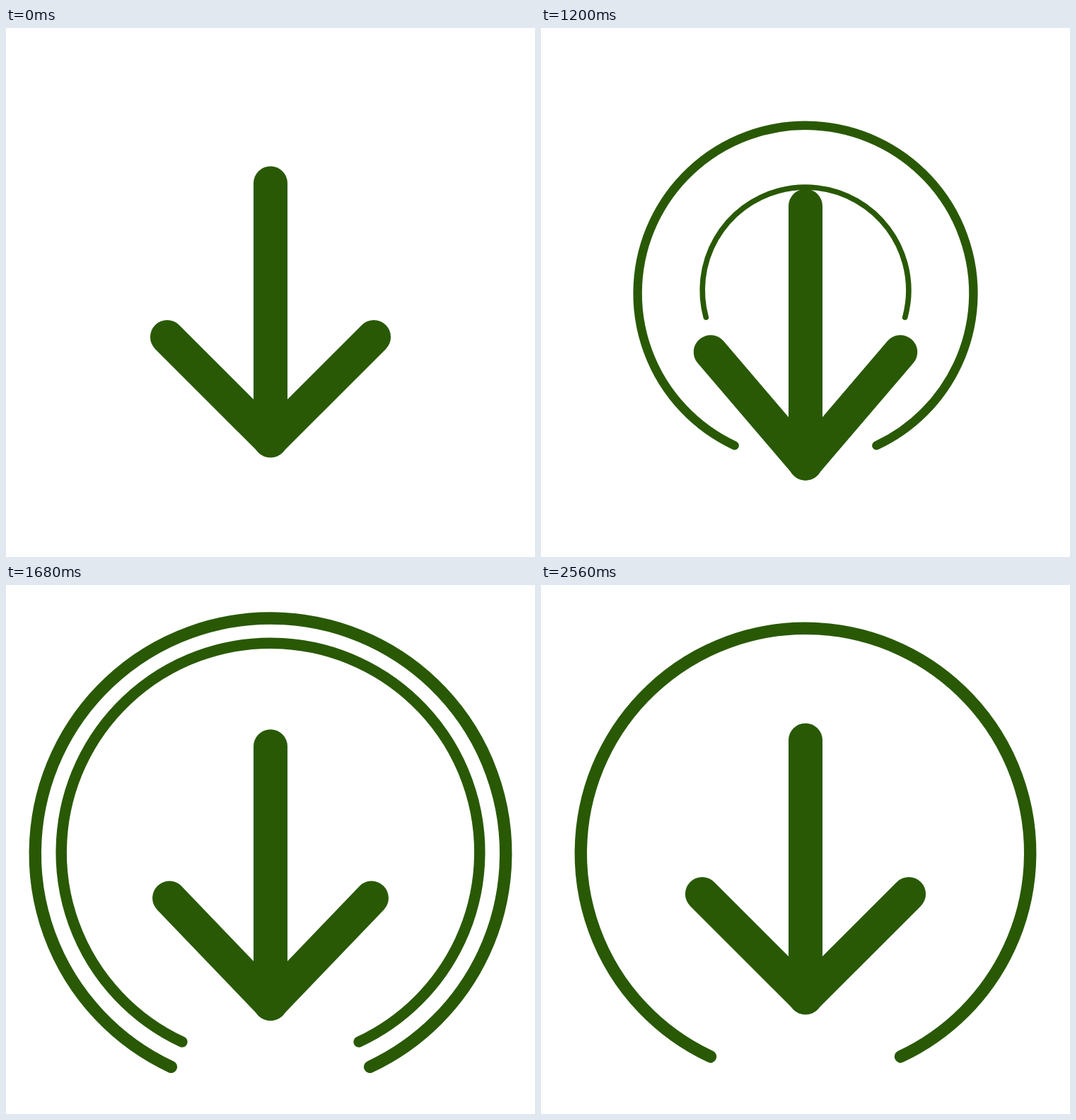
An HTML page with a canvas for the animation above (2720 ms loop, 748 px wide and 748 px high).

```html
<!DOCTYPE html>
<html lang="en">
<head>
<meta charset="utf-8">
<title>Download arrow</title>
<style>
  html, body { margin: 0; width: 100%; height: 100%; overflow: hidden; background: #fff; }
  canvas { display: block; width: 100vmin; height: 100vmin; }
</style>
</head>
<body>
<canvas id="stage" width="748" height="748"></canvas>
<script>
  const ctx = document.getElementById('stage').getContext('2d');
  const COLOR = '#295905';
  const LOOP = 2720, STEP = 40, LAST = 2560;
  const CX = 374, DEG = Math.PI / 180;

  // Eased progress from 0 to 1 between two times.
  function ease(t, start, end) {
    const u = Math.min(1, Math.max(0, (t - start) / (end - start)));
    return u * u * (3 - 2 * u);
  }

  function line(x1, y1, x2, y2) {
    ctx.beginPath();
    ctx.moveTo(x1, y1);
    ctx.lineTo(x2, y2);
    ctx.stroke();
  }

  function drawArrow(t) {
    const dip = ease(t, 0, 1000) - ease(t, 1000, 2000);
    const y = 36 * dip;
    const angle = (45 - 5 * dip) * DEG;
    const dx = 206.6 * Math.sin(angle);
    const dy = 206.6 * Math.cos(angle);
    const pivot = 583 + y;
    ctx.lineWidth = 48;
    line(CX, 219.5 + y, CX, 583.5 + y);
    line(CX, pivot, CX - dx, pivot - dy);
    line(CX, pivot, CX + dx, pivot - dy);
  }

  // The ring grows past full size, opens from the top, then settles.
  function drawRing(t) {
    const sweep = 155 * DEG * ease(t, 700, 1070);
    if (sweep <= 0) return;
    const scale = 1.05 * ease(t, 270, 1710) - 0.05 * ease(t, 1710, 2380);
    const top = -Math.PI / 2;
    ctx.lineWidth = 16.6 * scale;
    ctx.beginPath();
    ctx.arc(CX, 364 + 15 * scale, 317.3 * scale, top - sweep, top + sweep);
    ctx.stroke();
  }

  function render(now) {
    const t = Math.min(LAST, Math.floor((now % LOOP) / STEP) * STEP);
    ctx.fillStyle = '#fff';
    ctx.fillRect(0, 0, 748, 748);
    ctx.strokeStyle = COLOR;
    ctx.lineCap = 'round';
    drawRing(t);
    drawRing(t - 270);
    drawArrow(t);
  }

  const begin = performance.now();
  function tick() {
    render(performance.now() - begin);
    requestAnimationFrame(tick);
  }
  tick();
</script>
</body>
</html>
```
